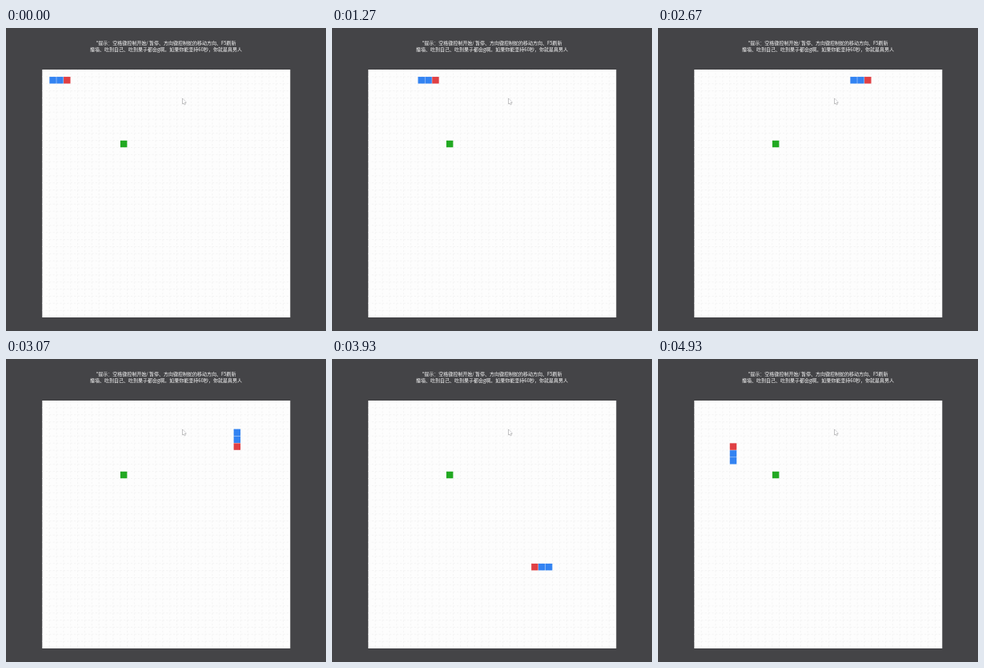
Animation, 400 px wide and 379 px high, one loop 4990 ms. Source, as an HTML page with a canvas:

```html
<!DOCTYPE html>
<html lang="zh">
<head>
<meta charset="utf-8">
<style>
  html, body { margin: 0; width: 100%; height: 100%; overflow: hidden; background: #444447; }
  canvas { display: block; }
</style>
</head>
<body>
<canvas id="stage" width="400" height="379"></canvas>
<script>
const ctx = document.getElementById('stage').getContext('2d');
const LOOP = 4990, COUNT = 35, LEFT = 45.3, TOP = 52, SIDE = 310, CELL = SIDE / COUNT;

// Corners of the head's path, in cells
const path = [[1, 1], [27, 1], [27, 23], [5, 23], [5, 1]];
// [tick, steps taken]: the snake speeds up as it goes
const pace = [[0, 0.3], [19, 6.4], [30, 13.4], [40, 21.5], [52, 37.5], [65, 61.5], [74, 85.5]];
const pointer = new Path2D('M0 0V6.5L1.5 5.2L2.5 7.5L3.6 7L2.6 4.8H4.6Z');

function stepsAt(tick) {
  let i = 1;
  while (i < pace.length - 1 && tick > pace[i][0]) i++;
  const [t0, n0] = pace[i - 1], [t1, n1] = pace[i];
  return Math.floor(n0 + (n1 - n0) * (tick - t0) / (t1 - t0));
}

function cellAt(dist) {
  for (let i = 1; i < path.length; i++) {
    const [x0, y0] = path[i - 1], [x1, y1] = path[i];
    const len = Math.abs(x1 - x0) + Math.abs(y1 - y0);
    if (dist <= len) return [x0 + (x1 - x0) * dist / len, y0 + (y1 - y0) * dist / len];
    dist -= len;
  }
  return path[path.length - 1];
}

function fillCell([col, row], color) {
  ctx.fillStyle = color;
  ctx.fillRect(LEFT + col * CELL + 0.2, TOP + row * CELL + 0.2, CELL - 0.4, CELL - 0.4);
}

function line(x0, y0, x1, y1) {
  ctx.beginPath();
  ctx.moveTo(x0, y0);
  ctx.lineTo(x1, y1);
  ctx.stroke();
}

function drawBoard() {
  ctx.fillStyle = '#fdfdfd';
  ctx.fillRect(LEFT, TOP, SIDE, SIDE);
  ctx.strokeStyle = '#f3f3f3';
  ctx.lineWidth = 0.9;
  ctx.setLineDash([CELL / 4, CELL / 4]);
  for (let i = 1; i < COUNT; i++) {
    const d = i * CELL;
    line(LEFT + d, TOP, LEFT + d, TOP + SIDE);
    line(LEFT, TOP + d, LEFT + SIDE, TOP + d);
  }
  ctx.setLineDash([]);
}

function drawHint() {
  ctx.font = '500 6px "Noto Sans CJK SC", "Noto Sans CJK", sans-serif';
  ctx.textAlign = 'center';
  ctx.textBaseline = 'alphabetic';
  ctx.fillStyle = '#fff';
  ctx.fillText('"提示：空格键控制开始/ 暂停、方向键控制蛇的移动方向、F5刷新', 200, 21);
  ctx.fillText('撞墙、吃到自己、吃到果子都会g啊。如果你能坚持60秒，你就是真男人', 200, 28.8);
}

function drawPointer() {
  ctx.save();
  ctx.translate(220.6, 88.3);
  ctx.fillStyle = '#fff';
  ctx.strokeStyle = '#77777a';
  ctx.lineWidth = 0.8;
  ctx.stroke(pointer);
  ctx.fill(pointer);
  ctx.restore();
}

function draw(ms) {
  // 15 ticks a second, on a 10 ms clock
  const tick = Math.floor((Math.floor(ms / 10) + 0.5) * 0.15);
  const head = stepsAt(tick) + 2;
  ctx.fillStyle = '#444447';
  ctx.fillRect(0, 0, 400, 379);
  drawBoard();
  drawHint();
  fillCell([11, 10], '#22a922');
  fillCell(cellAt(head - 2), '#3383f2');
  fillCell(cellAt(head - 1), '#3383f2');
  fillCell(cellAt(head), '#e04044');
  drawPointer();
}

const start = performance.now();
function loop() {
  draw((performance.now() - start) % LOOP);
  requestAnimationFrame(loop);
}
loop();
</script>
</body>
</html>
```
